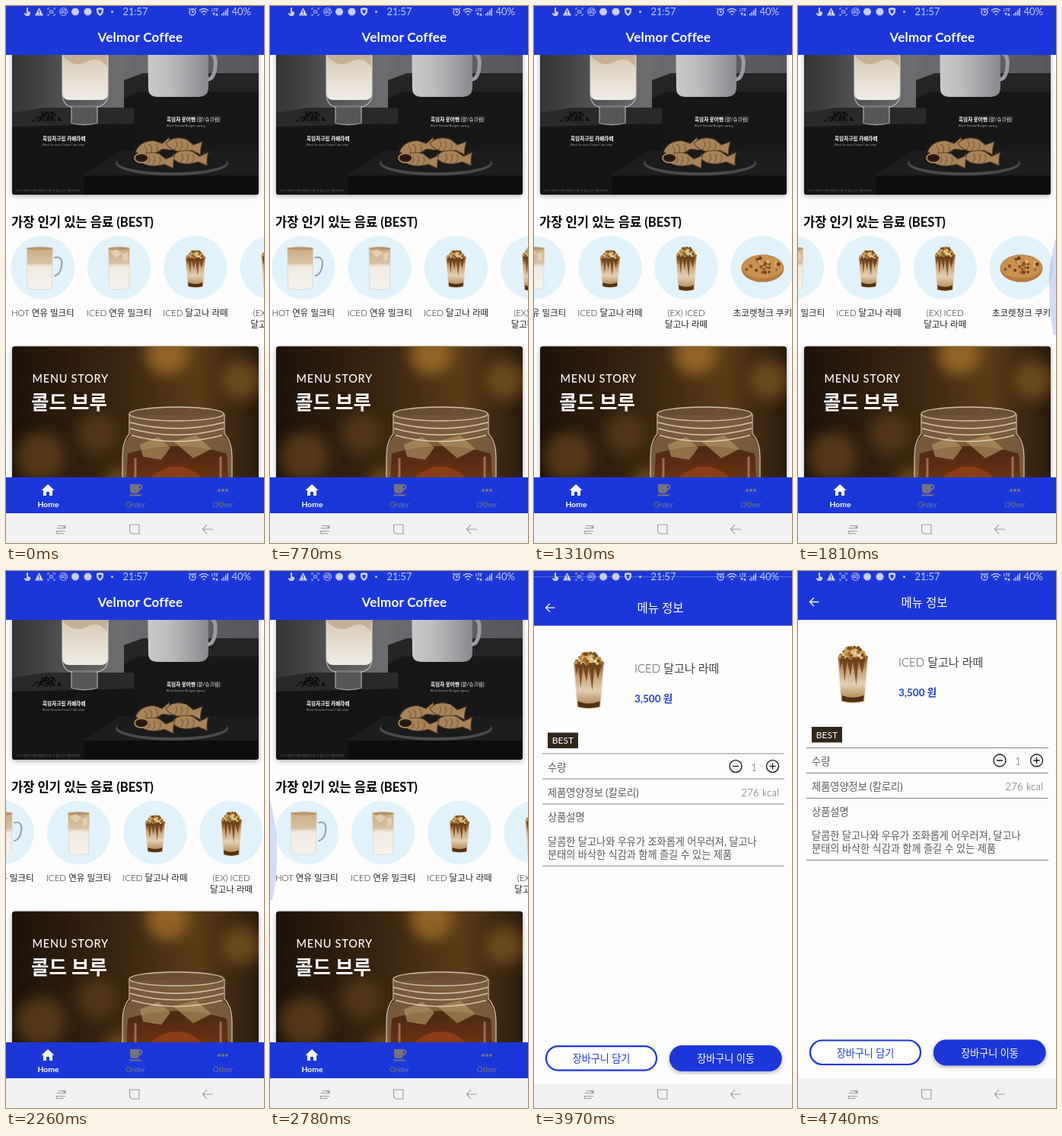
An HTML page for the animation above (4.79 s loop, 339 px wide and 703 px high).

```html
<!DOCTYPE html>
<html lang="ko">
<head>
<meta charset="utf-8">
<style>
html, body { margin: 0; width: 100%; height: 100%; overflow: hidden; background: #000; }
svg { display: block; width: 100vw; height: 100vh; }
text { font-family: Lato, 'Noto Sans CJK KR', 'Noto Sans CJK', sans-serif; }
.mid { text-anchor: middle; }
.end { text-anchor: end; }
.b { font-weight: 700; }
.m { font-weight: 500; }
.l { font-weight: 300; }
.line { fill: none; stroke-width: 1.3; }
</style>
</head>
<body>
<svg viewBox="0 0 339 703" preserveAspectRatio="none">
<defs>
  <linearGradient id="wall" x2="1">
    <stop stop-color="#353537"/><stop offset=".42" stop-color="#6d6d70"/><stop offset="1" stop-color="#55555a"/>
  </linearGradient>
  <linearGradient id="wood" x2="1">
    <stop stop-color="#1d1209"/><stop offset=".45" stop-color="#3b2610"/><stop offset=".75" stop-color="#5b3c18"/><stop offset="1" stop-color="#2a1a0c"/>
  </linearGradient>
  <linearGradient id="cream" y2="1" x2="0">
    <stop stop-color="#c9b394"/><stop offset=".55" stop-color="#e2d8c8"/><stop offset="1" stop-color="#efece6"/>
  </linearGradient>
  <linearGradient id="tea" y2="1" x2="0">
    <stop stop-color="#cdae85"/><stop offset=".36" stop-color="#d7bf9f"/><stop offset=".46" stop-color="#f0ebe3"/><stop offset="1" stop-color="#f5f2ed"/>
  </linearGradient>
  <linearGradient id="latte" y2="1" x2="0">
    <stop stop-color="#7a4a1c"/><stop offset=".3" stop-color="#c8a274"/><stop offset=".6" stop-color="#e3cfb2"/><stop offset="1" stop-color="#a4763f"/>
  </linearGradient>
  <linearGradient id="mug" x2="1">
    <stop stop-color="#c9c9cc"/><stop offset=".4" stop-color="#bababd"/><stop offset="1" stop-color="#88888c"/>
  </linearGradient>
  <linearGradient id="brew" y2="1" x2="0">
    <stop stop-color="#4a2a12"/><stop offset="1" stop-color="#7b3414"/>
  </linearGradient>
  <filter id="shade" x="-10%" y="-10%" width="120%" height="120%"><feDropShadow dx="0" dy="2" stdDeviation="3" flood-opacity=".3"/></filter>
  <filter id="soft" x="-50%" y="-50%" width="200%" height="200%"><feGaussianBlur stdDeviation="9"/></filter>
  <clipPath id="top"><rect x="8" y="40" width="324" height="207" rx="4"/></clipPath>
  <clipPath id="low"><rect x="8" y="445.500" width="324" height="190" rx="4"/></clipPath>
  <g id="dalgona"></g>
</defs>

<g id="home">
  <rect width="339" height="703" fill="#fdfdfd"/>
  <rect x="8" y="40" width="324" height="207" rx="4" filter="url(#shade)"/>
  <g clip-path="url(#top)">
    <rect x="8" y="40" width="324" height="207" fill="url(#wall)"/>
    <path d="M155 97L180 88H332V190H155Z" fill="#242426"/>
    <path d="M155 122L172 112H332V200H155Z" fill="#171718"/>
    <path d="M8 140L50 133H168V247H8Z" fill="#29292b"/>
    <path d="M8 158L168 154V247H8Z" fill="#151516"/>
    <path d="M103 220L150 190H332V247H103Z" fill="#1d1d1f"/>
    <path d="M103 222H332V247H103Z" fill="#0d0d0e"/>
    <path d="M74 40H134V115Q133 123 125 123H83Q75 123 74 115Z" fill="url(#cream)"/>
    <path d="M75 66Q90 82 106 73T133 80V64H75Z" fill="#b59b7b" opacity=".55"/>
    <path d="M74 64V116Q75 130 86 132V153Q103 158 120 153V132Q133 130 134 116V64" class="line" stroke="#d9d9d9" opacity=".7"/>
    <path d="M86 130H120V152Q103 157 86 152Z" fill="#aaa" opacity=".35"/>
    <path d="M186 40H266V108Q265 119 253 119H200Q187 119 187 108Z" fill="url(#mug)"/>
    <path d="M265 60Q277 62 275 80Q273 96 265 96" fill="none" stroke="#9b9b9f" stroke-width="5"/>
    <g id="seeds" fill="#0b0b0b"></g>
    <ellipse cx="218" cy="206" rx="74" ry="16" fill="#4b4b4d"/>
    <ellipse cx="218" cy="204" rx="72" ry="14" fill="#1b1b1c"/>
    <g id="fish"></g>
    <g fill="#fff">
      <text x="48" y="176" font-size="6.6" class="b">흑임자크림 카페라떼</text>
      <text x="48" y="183" font-size="4" opacity=".6">Black Sesame Cream Cafe Latte</text>
      <text x="211" y="151" font-size="6.6"><tspan class="b">흑임자 붕어빵</tspan> (팥/슈크림)</text>
      <text x="211" y="158" font-size="4" opacity=".6">Black Sesame Bungeo-ppang</text>
      <text x="13" y="243" font-size="3.600" opacity=".35">상기 이미지는 실제 제품과 다를 수 있습니다. 매장에 문의</text>
    </g>
  </g>

  <text x="7" y="288.500" font-size="16.6" class="b">가장 인기 있는 음료 (BEST)</text>
  <g id="list"></g>
  <g fill="#1c37d9" fill-opacity=".18">
    <path id="glowL" d="M0 300Q9 332 9 366Q9 405 3 431H0Z"/>
    <path id="glowR" d="M339 303Q330 332 330 366Q330 405 336 431H339Z"/>
  </g>

  <rect x="8" y="446" width="324" height="190" rx="4" filter="url(#shade)"/>
  <g clip-path="url(#low)">
    <rect x="8" y="445" width="324" height="190" fill="url(#wood)"/>
    <g filter="url(#soft)">
      <circle cx="212" cy="455" r="28" fill="#a8742c" opacity=".75"/>
      <circle cx="310" cy="490" r="26" fill="#8c6227" opacity=".6"/>
      <circle cx="45" cy="590" r="32" fill="#76501f" opacity=".6"/>
      <circle cx="120" cy="560" r="26" fill="#5e3f18" opacity=".7"/>
      <circle cx="150" cy="625" r="20" fill="#8f6428" opacity=".6"/>
    </g>
    <path d="M163 536V562Q154 572 153 590V640H297V590Q296 572 286 562V536Z" fill="#8a6b48" opacity=".75"/>
    <path d="M160 586Q224 566 290 586L293 640H157Z" fill="url(#brew)"/>
    <path d="M176 574L200 564L216 578L204 594L180 590ZM220 570L250 562L270 580L246 592Z" fill="#b79468" opacity=".65"/>
    <path d="M190 617Q224 588 258 617Z" fill="#a5451c" opacity=".6"/>
    <g class="line" stroke="#e5d8c5" opacity=".85">
      <ellipse cx="224" cy="534" rx="62" ry="9" fill="#6e5436"/>
      <path d="M162 545Q224 561 287 545M163 553Q224 570 286 553M165 562Q224 578 284 562"/>
      <path d="M162 534V560Q153 570 153 590V630M287 534V560Q297 570 297 590V630"/>
      <path d="M170 592V617M282 590V617" stroke-width="3" opacity=".45"/>
    </g>
    <text x="34.500" y="493" font-size="14.500" letter-spacing=".75" fill="#fff" class="m">MENU STORY</text>
    <text x="33" y="528" font-size="25.500" fill="#fff" class="b">콜드 브루</text>
  </g>

  <rect width="339" height="64" fill="#1c37d9"/>
  <text x="176.500" y="47" font-size="17" letter-spacing=".25" fill="#fff" class="mid b">Velmor Coffee</text>
  <rect y="617" width="339" height="47" fill="#1c37d9"/>
  <path d="M55 626L46.500 634H49V641H53V636H57V641H61V634H63.500Z" fill="#fff"/>
  <g fill="#74747f">
    <path d="M163 626H175Q179 626 179 630T175 634V635Q174 638 171 638H167Q163 638 163 634ZM175 628V632Q177 632 177 630T175 628ZM162 639.500H178V641.500H162Z"/>
    <circle cx="280" cy="634" r="1.900"/><circle cx="285" cy="634" r="1.900"/><circle cx="290" cy="634" r="1.900"/>
  </g>
  <g font-size="10.300" class="mid" fill="#74747f">
    <text x="55.500" y="655.500" fill="#fff" class="b">Home</text>
    <text x="170" y="655.500">Order</text>
    <text x="285" y="655.500">Other</text>
  </g>
  <rect y="664" width="339" height="39" fill="#f1f1f1"/>
</g>

<g id="card">
  <rect width="339" height="703" fill="#fdfdfd"/>
  <rect width="339" height="64" fill="#1c37d9"/>
  <path d="M27.500 40.500H16M21 35L15.500 40.500L21 46" class="line" stroke="#fff" stroke-width="1.600"/>
  <text x="166" y="46.500" font-size="15.500" fill="#fff" class="mid m">메뉴 정보</text>
  <use id="cup" href="#dalgona" transform="translate(72 134.500) scale(1.52 1.49)"/>
  <text x="132" y="125" font-size="15" fill="#444" class="l">ICED 달고나 라떼</text>
  <text x="132" y="164" font-size="13.500" fill="#2440cc" class="b">3,500 원</text>
  <rect x="18" y="204" width="40" height="20.500" fill="#31261a"/>
  <text x="38" y="218.700" font-size="12" fill="#fff" class="mid">BEST</text>
  <path d="M11 231.500H329M11 264.500H329M11 297.500H329M11 378.500H329" stroke="#858585"/>
  <g font-size="13.200" fill="#5a5a5a">
    <text x="18" y="254" class="m">수량</text>
    <text x="289" y="254" class="mid l">1</text>
    <text x="18" y="287" class="m">제품영양정보 (칼로리)</text>
    <text x="322.500" y="287" class="end l" letter-spacing=".3">276 kcal</text>
    <text x="18" y="319.500" class="m">상품설명</text>
    <text x="18" y="351">달콤한 달고나와 우유가 조화롭게 어우러져, 달고나</text>
    <text x="18" y="368">분태의 바삭한 식감과 함께 즐길 수 있는 제품</text>
  </g>
  <g class="line" stroke="#111">
    <circle cx="265" cy="248" r="8"/><circle cx="313.500" cy="248" r="8"/>
    <path d="M261 248H269M309.500 248H317.500M313.500 244V252"/>
  </g>
  <rect x="178" y="614" width="147.500" height="33.500" rx="16.700" fill="#1c37d9" filter="url(#shade)"/>
  <rect x="178" y="613.500" width="147.500" height="33.500" rx="16.700" fill="#1c37d9"/>
  <rect x="16" y="614.500" width="145" height="31.500" rx="15.700" fill="#fff" stroke="#1c37d9" stroke-width="2.200"/>
  <g font-size="13.100" class="mid m">
    <text x="88.500" y="635.500" fill="#1c37d9">장바구니 담기</text>
    <text x="252" y="635.500" fill="#fff">장바구니 이동</text>
  </g>
  <rect y="664" width="339" height="39" fill="#f1f1f1"/>
</g>

<g fill="#c8cef5">
  <path d="M27 2H29V7L32 8V11L30 13H26L23 9L27 10Z"/>
  <path fill-rule="evenodd" d="M43.500 2L49 12.500H38ZM43 5.500V9H44V5.500ZM43 10V11.200H44V10Z"/>
  <path d="M55 5V3H57M62 3H64V5M64 10V12H62M57 12H55V10M57.500 6H61.500V9H57.500Z" class="line" stroke="#8d99ec"/>
  <circle cx="75.500" cy="7.500" r="5" class="line" stroke="#c8cef5" style="stroke-width:.9"/>
  <text x="75.500" y="10" font-size="6.500" class="mid b">40</text>
  <circle cx="91" cy="7.500" r="5"/><circle cx="107.500" cy="7.500" r="5"/>
  <path fill-rule="evenodd" d="M119 3L123.500 2L128 3V8Q127 11 123.500 13Q120 11 119 8ZM121.500 5V8Q122 9 123.500 10Q125 9 125.500 8V5Z"/>
  <circle cx="139.500" cy="7.500" r="1.500"/>
  <text x="170" y="12" font-size="12.800" class="mid">21:57</text>
  <g class="line" stroke="#c8cef5">
    <circle cx="245" cy="8" r="4"/><path d="M245 5.500V8H247M240 4L242 2.500M250 4L248 2.500"/>
    <path d="M254 6Q260 1 266 6M256 8.500Q260 5 264 8.500M258.500 11H261.500"/>
  </g>
  <text x="274.500" y="7" font-size="5.500" class="mid b">LTE</text>
  <path d="M271 9L273 12.500L275 9ZM275 12.500L277 9L279 12.500ZM283 10H284.500V12.500H283ZM285.500 8H287V12.500H285.500ZM288 5.500H289.500V12.500H288ZM290.500 3H292V12.500H290.500Z"/>
  <text x="322" y="12.300" font-size="13" class="end">40%</text>
</g>
<g class="line" stroke="#999" style="stroke-width:1.100">
  <path d="M66.500 683.500H78V680.500H69M66.500 687.500H78M66.500 687.500V690.500H76M78 683.500L75 680.500"/>
  <path d="M162.500 679H175V691H165L162.500 688Z"/>
  <path d="M271.500 685H258.500M264 679L258.500 685L264 691"/>
</g>
</svg>

<script>
const $ = id => document.getElementById(id);
let seed = 7;
const rand = () => (seed = seed * 16807 % 2147483647) / 2147483647;
const dots = (n, f) => Array.from({ length: n }, (_, i) => f(i)).join('');
const dot = (x, y, r, fill) => `<circle cx="${x}" cy="${y}" r="${r}"${fill ? ` fill="${fill}"` : ''}/>`;
const pick = list => list[Math.floor(rand() * list.length)];

$('seeds').innerHTML = dots(70, () => {
  const y = rand();
  return dot(55 + (rand() - .5) * (12 + 34 * y), 139 + 12 * y, 1.1);
});
$('fish').innerHTML = [[192, 186, -12], [232, 183, 8], [240, 199, 4], [196, 202, 6]].map(([x, y, a]) =>
  `<g transform="translate(${x} ${y}) rotate(${a})"><path d="M-22 0Q-14 -12 4 -9L14 -3L25 -9Q23 0 25 8L13 4Q-12 13 -22 0Z" fill="#a98358" stroke="#5c4027"/>
  <path d="M-10 -5Q-5 0 -10 6M-3 -6Q2 0 -3 6M5 -5Q9 0 5 5" fill="none" stroke="#765536"/></g>`).join('') +
  '<ellipse cx="178" cy="199" rx="9" ry="6" fill="#2b1a13" stroke="#a98358" stroke-width="2"/>';

// Drinks are drawn around their own centre.
$('dalgona').innerHTML = `<path d="M-13 -15H13L10 24Q0 27 -10 24Z" fill="url(#latte)"/>
  <path d="M-11 -14V-4L-9 -12L-7 7L-5 -12L-2 2L0 -12L3 10L5 -12L8 0L11 -14Z" fill="#60340f" opacity=".75"/>
  <path d="M-9.500 19Q0 23 9.500 19L9 24Q0 26 -9 24Z" fill="#54300f"/>
  <path d="M-13 -15L-10 24M13 -15L10 24" stroke="#eee3d2" stroke-width=".8" opacity=".8"/>` +
  dots(48, () => {
    const k = rand();
    return dot((rand() - .5) * (12 + 13 * k), -23 + 9 * k, 1.6, pick(['#c8984f', '#9c6c2c', '#e0bd80', '#7d501d']));
  });
const glass = w => `<path d="M${-w} -27H${w}L${w - 1} 26Q0 30 ${1 - w} 26Z" fill="url(#tea)" stroke="#d8d2c8" stroke-width=".7"/>
  <ellipse cy="-26" rx="${w}" ry="2.200" fill="#b8946a"/>`;
const hot = `<path d="M15 -14Q26 -17 25 -5Q24 8 15 10" fill="none" stroke="#9aa0a3" stroke-width="2"/><g transform="translate(-4 0)">${glass(17)}</g>`;
const iced = glass(14) + '<path d="M-12 -22L-3 -25L4 -20L-4 -14ZM4 -18L11 -22L12 -12L6 -9Z" fill="#e8d8bf" opacity=".7"/>';
const cup = (x, y) => `<use href="#dalgona" transform="scale(${x} ${y})"/>`;
const cookie = '<ellipse rx="28" ry="18" fill="#b77b3d"/><ellipse cy="-2" rx="27" ry="15" fill="#c99150"/>' +
  dots(30, () => {
    const a = rand() * 6.283, r = Math.sqrt(rand());
    return dot(24 * r * Math.cos(a), 13 * r * Math.sin(a) - 1, 1 + 1.6 * rand(), pick(['#6b3d1b', '#8c5526', '#deb071']));
  });

const items = [
  [hot, 'HOT 연유 밀크티'],
  [iced, 'ICED 연유 밀크티'],
  [cup(1, .98), 'ICED 달고나 라떼'],
  [cup(1.04, 1.16), '(EX) ICED', '달고나 라떼'],
  [cookie, '초코렛청크 쿠키']
];
$('list').innerHTML = items.map(([art, ...lines], i) =>
  `<g transform="translate(${48.3 + i * 100.3} 342.5)"><circle r="41.800" fill="#e2f2fa"/>
  <g transform="translate(0 1)">${art}</g>` +
  lines.map((s, k) => `<text y="${63.5 + k * 15}" font-size="11.500" fill="#222" class="mid l">${s}</text>`).join('') + '</g>').join('');

const LOOP = 4790, END = 156, OPEN = 3730;
const ramp = (t, a, b) => Math.min(1, Math.max(0, (t - a) / (b - a)));
const ease = (t, a, b) => { const p = ramp(t, a, b); return p * p * (3 - 2 * p); };
const pulse = (t, a, b, c, d) => ramp(t, a, b) - ramp(t, c, d);
const moveY = (id, y) => $(id).setAttribute('transform', `translate(0 ${y})`);

function draw(now) {
  const t = now % LOOP;
  const scroll = END * (ease(t, 700, 1400) - ease(t, 1890, 2500));
  $('list').setAttribute('transform', `translate(${-scroll} 0)`);
  $('glowR').setAttribute('opacity', pulse(t, 1400, 1550, 1820, 2000));
  $('glowL').setAttribute('opacity', pulse(t, 2500, 2620, 2800, 2990));

  const open = t >= OPEN, p = ramp(t, OPEN, OPEN + 420), left = (1 - p) ** 3;
  $('card').style.display = open ? '' : 'none';
  $('card').setAttribute('opacity', Math.min(1, .7 + 2 * p));
  moveY('card', 98 * left);
  moveY('home', open ? 6 * left - 12 : 0);
  $('cup').style.display = t > 3900 ? '' : 'none';
  requestAnimationFrame(tick);
}
const start = performance.now();
function tick() { draw(performance.now() - start); }
tick();
</script>
</body>
</html>
```
